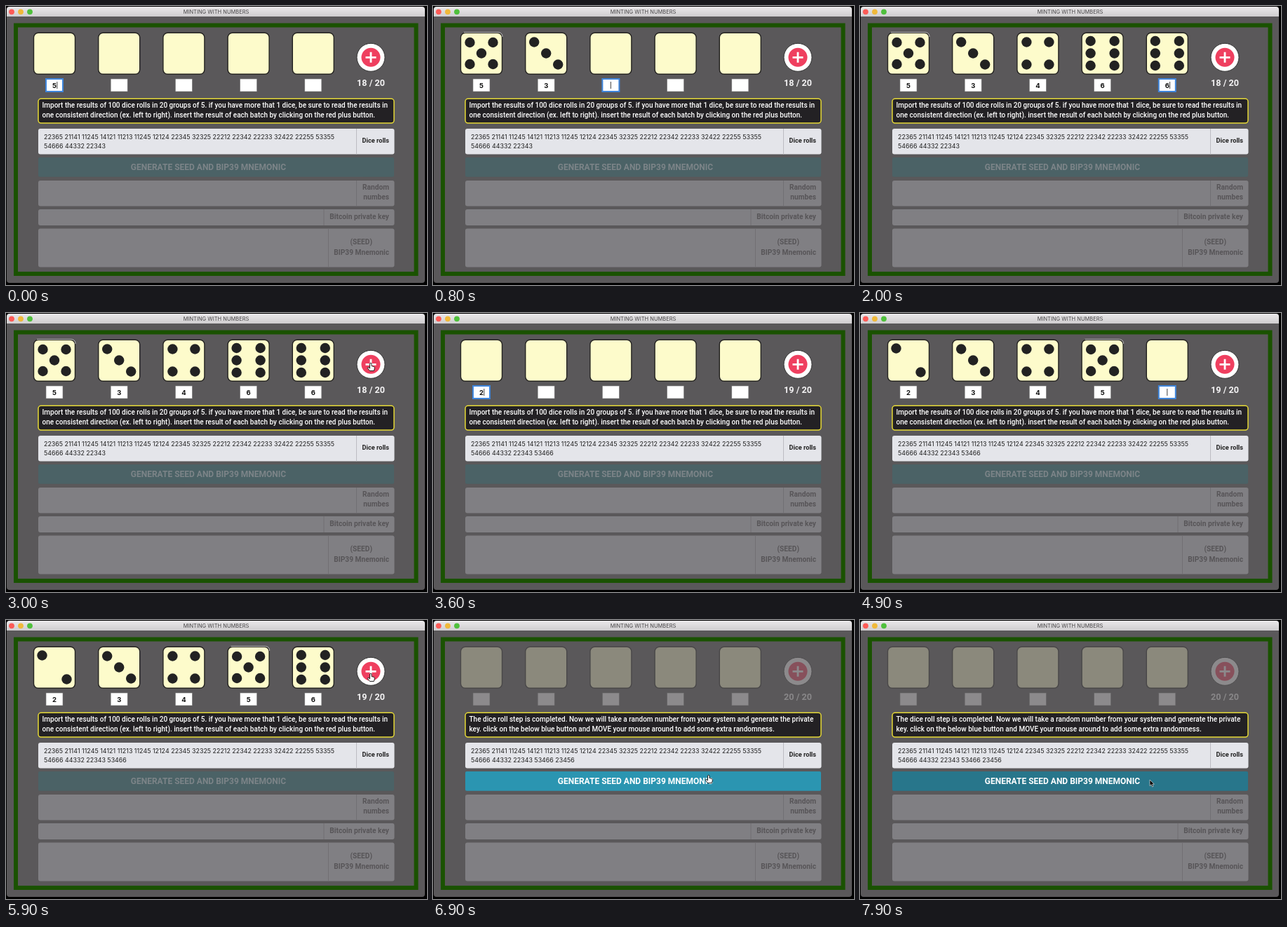
These frames come from a looping animation (600x398 px, 8000 ms). An HTML page:

```html
<!DOCTYPE html>
<html lang="en">
<head>
<meta charset="utf-8">
<title>Dice seed generator</title>
<style>
  html, body { margin: 0; width: 100%; height: 100%; overflow: hidden; background: #000; }
  svg { display: block; width: 600px; height: 398px; font-family: Roboto, sans-serif; }
  .inter { font-family: Inter, sans-serif; }
  .mid { text-anchor: middle; }
  .tip { font-size: 10px; font-weight: 500; fill: #fff; }
  .rolls { font: 8.88px Inter, sans-serif; font-kerning: none; fill: #222; }
  .label { font-size: 10.2px; font-weight: 700; fill: #575558; text-anchor: end; }
  .button { font-size: 12px; font-weight: 700; }
  .count { font-size: 12.6px; font-weight: 700; }
  .digit { font: 700 9.5px Inter, sans-serif; fill: #111; }
</style>
</head>
<body>
<svg viewBox="0 0 600 398">
  <defs>
    <linearGradient id="bar" x2="0" y2="1">
      <stop stop-color="#ebe9eb"/><stop offset="1" stop-color="#cfcdcf"/>
    </linearGradient>
  </defs>
  <rect width="600" height="398"/>
  <path d="M1 15H597V391Q597 395 593 395H5Q1 395 1 391Z" fill="#5a585a"/>
  <path d="M1 15V5Q1 1 5 1H593Q597 1 597 5V15Z" fill="url(#bar)"/>
  <circle cx="8" cy="8.300" r="3.900" fill="#fc5b57"/>
  <circle cx="21" cy="8.300" r="3.900" fill="#f0b93a"/>
  <circle cx="34" cy="8.300" r="3.900" fill="#4fc03c"/>
  <text class="inter mid" x="299.500" y="11.300" font-size="7.500" fill="#454345">MINTING WITH NUMBERS</text>
  <rect x="14" y="27.500" width="570.500" height="354.500" fill="none" stroke="#1a5200" stroke-width="6"/>

  <rect x="46" y="175" width="507.500" height="36.500" rx="3" fill="#e4e5ea"/>
  <path d="M499.500 175V211.500" stroke="#bcbcc2"/>
  <text class="label" x="546" y="195.300" style="font-size:9.2px;fill:#222">Dice rolls</text>

  <g fill="#807f83">
    <rect x="46" y="249" width="507.500" height="36.500" rx="3"/>
    <rect x="46" y="290" width="507.500" height="23" rx="3"/>
    <rect x="46" y="317.500" width="507.500" height="55" rx="3"/>
  </g>
  <path d="M499.500 249V285.500M453 290V313M459.500 317.500V372.500" stroke="#716f73"/>
  <text class="label" x="546" y="262">Random</text>
  <text class="label" x="546" y="276">numbes</text>
  <text class="label" x="546" y="304">Bitcoin private key</text>
  <text class="label" x="522" y="340">(SEED)</text>
  <text class="label" x="546" y="354.500">BIP39 Mnemonic</text>

  <g id="live"></g>
  <path id="hand" d="M-1.500 -5Q0 -6.500 1 -5V-1.500L4.500 -.5Q5.500 0 5.300 2L4.300 5.500H-1.500L-4.700 1.500Q-4.500 -.3 -2.800 .8L-1.500 2Z" fill="#fff" stroke="#111" stroke-width=".9"/>
  <path id="arrow" d="M0 0V8.500L2 6.700L3.500 10L5 9.300L3.600 6.200H6.300Z" fill="#000" stroke="#ddd" stroke-width=".7"/>
</svg>
<script>
const LOOP = 8000, STEP = 100, PRESS = 7300;
const TIPS = [
  ['Import the results of 100 dice rolls in 20 groups of 5. if you have more that 1 dice, be sure to read the results in',
   'one consistent direction (ex. left to right). insert the result of each batch by clicking on the red plus button.'],
  ['The dice roll step is completed. Now we will take a random number from your system and generate the private',
   'key. click on the below blue button and MOVE your mouse around to add some extra randomness.']
];
const FIRST_ROW = '22365 21141 11245 14121 11213 11245 12124 22345 32325 22212 22342 22233 32422 22255 53355';
const ROUNDS = [
  { digits: '53466', keys: [0, 500, 1000, 1400, 1700], blur: 2500, end: 3200 },
  { digits: '23456', keys: [3600, 3900, 4200, 4600, 5000], blur: 5400, end: 6200 }
];
// Pips per face: half spread in x and y, then unit positions
const DIAGONAL = [[-1, -1], [1, 1]];
const CORNERS = [...DIAGONAL, [1, -1], [-1, 1]];
const FACES = {
  2: [17.5, 17, DIAGONAL],
  3: [17, 16, [...DIAGONAL, [0, 0]]],
  4: [16, 16, CORNERS],
  5: [16.5, 15.5, [...CORNERS, [0, 0]]],
  6: [17, 17.5, [...CORNERS, [-1, 0], [1, 0]]]
};
// Pointer stops: time, x, y
const HANDS = [
  [[2600, 522, 80], [2900, 520, 77], [3400, 520, 77]],
  [[5500, 536, 84], [5800, 520, 82], [6200, 520, 82]],
  [[6700, 398, 222], [6900, 393, 227], [7300, 393, 227]]
];
const ARROWS = [
  [[5200, 558, 98], [5500, 540, 90]],
  [[6300, 508, 110], [6700, 400, 218]],
  [[7300, 393, 224], [7500, 432, 194], [7700, 436, 216], [7900, 413, 228], [8000, 413, 228]]
];
const $ = id => document.getElementById(id);
const text = (cls, x, y, s, fill = '') =>
  `<text class="${cls}" x="${x}" y="${y}"${fill && ` fill="${fill}"`}>${s}</text>`;

function die(cx, face) {
  let out = `<rect x="${cx - 29.5}" y="38.3" width="59" height="59" rx="6.500" fill="#fdfbcb" stroke="#242321" stroke-width="1.400"/>`;
  if (face) {
    const [sx, sy, pips] = FACES[face];
    for (const [x, y] of pips)
      out += `<circle cx="${cx + x * sx}" cy="${67.5 + y * sy}" r="7.200" fill="#222"/>`;
    if (face === '5') out += `<path d="M${cx - 25} 37.500H${cx + 24}Q${cx + 30} 38 ${cx + 30} 44" fill="none" stroke="#ddd" stroke-width=".8"/>`;
  }
  return out;
}

function input(cx, digit, focused) {
  const caret = cx + (digit ? 3.8 : 0);
  return `<rect x="${cx - 12}" y="104" width="24" height="18" fill="#fff"
      stroke="${focused ? '#3f86dc' : '#777'}" stroke-width="${focused ? 2 : .6}"/>`
    + text('digit mid', cx, 116.5, digit)
    + (focused ? `<path d="M${caret} 108V118" stroke="#111" stroke-width=".8"/>` : '');
}

function live(t) {
  const round = ROUNDS.findIndex(r => t < r.end), done = round < 0;
  const r = ROUNDS[round];
  const focus = done || t >= r.blur ? -1 : r.keys.filter(k => t >= k - 200).length - 1;
  let out = `<g opacity="${done ? .3 : 1}">`;
  for (let i = 0; i < 5; i++) {
    const cx = 69 + 92.2 * i, since = done ? -1 : t - r.keys[i];
    out += die(cx, since >= 200 && r.digits[i])
      + input(cx, since >= 0 ? r.digits[i] : '', i === focus);
  }
  out += `<circle cx="520" cy="73.300" r="20" fill="#fff" stroke="#333" stroke-width="1"/>
    <circle cx="520" cy="73.300" r="13.500" fill="#ef3f5f"/>
    <path d="M512.500 73.300H527.500M520 65.800V80.800" stroke="#fff" stroke-width="2.800"/>`
    + text('count mid', 520, 114.3, (done ? 20 : 18 + round) + ' / 20', '#f4f3f4') + '</g>';

  out += '<rect x="46" y="132.300" width="507" height="34.800" rx="4" fill="#232124" stroke="#e6d936" stroke-width="1.500"/>';
  TIPS[+done].forEach((line, i) => out += text('tip', 51.5, 145 + 13.5 * i, line));

  const added = ROUNDS.filter(q => t >= q.end).map(q => ' ' + q.digits).join('');
  out += text('rolls', 54, 189.5, FIRST_ROW) + text('rolls', 54, 203.3, '54666 44332 22343' + added);

  const fill = !done ? '#4b6266' : t < PRESS ? '#2b95b1' : '#28768b';
  out += `<rect x="46" y="216" width="507" height="27.800" rx="2" fill="${fill}"/>`
    + text('button mid', 288.5, 233.8, 'GENERATE SEED AND BIP39 MNEMONIC', done ? '#fff' : '#7c8488');
  return out;
}

function place(el, paths, t) {
  const path = paths.find(p => t >= p[0][0] && t < p[p.length - 1][0]);
  el.style.display = path ? '' : 'none';
  if (!path) return;
  const i = path.findIndex(p => t < p[0]);
  const [t0, x0, y0] = path[i - 1], [t1, x1, y1] = path[i];
  const k = (t - t0) / (t1 - t0);
  el.setAttribute('transform', `translate(${x0 + (x1 - x0) * k} ${y0 + (y1 - y0) * k})`);
}

let last = -1;
function frame() {
  const t = Math.floor(performance.now() % LOOP / STEP) * STEP;
  if (t !== last) {
    last = t;
    $('live').innerHTML = live(t);
    place($('hand'), HANDS, t);
    place($('arrow'), ARROWS, t);
  }
  requestAnimationFrame(frame);
}
frame();
</script>
</body>
</html>
```
